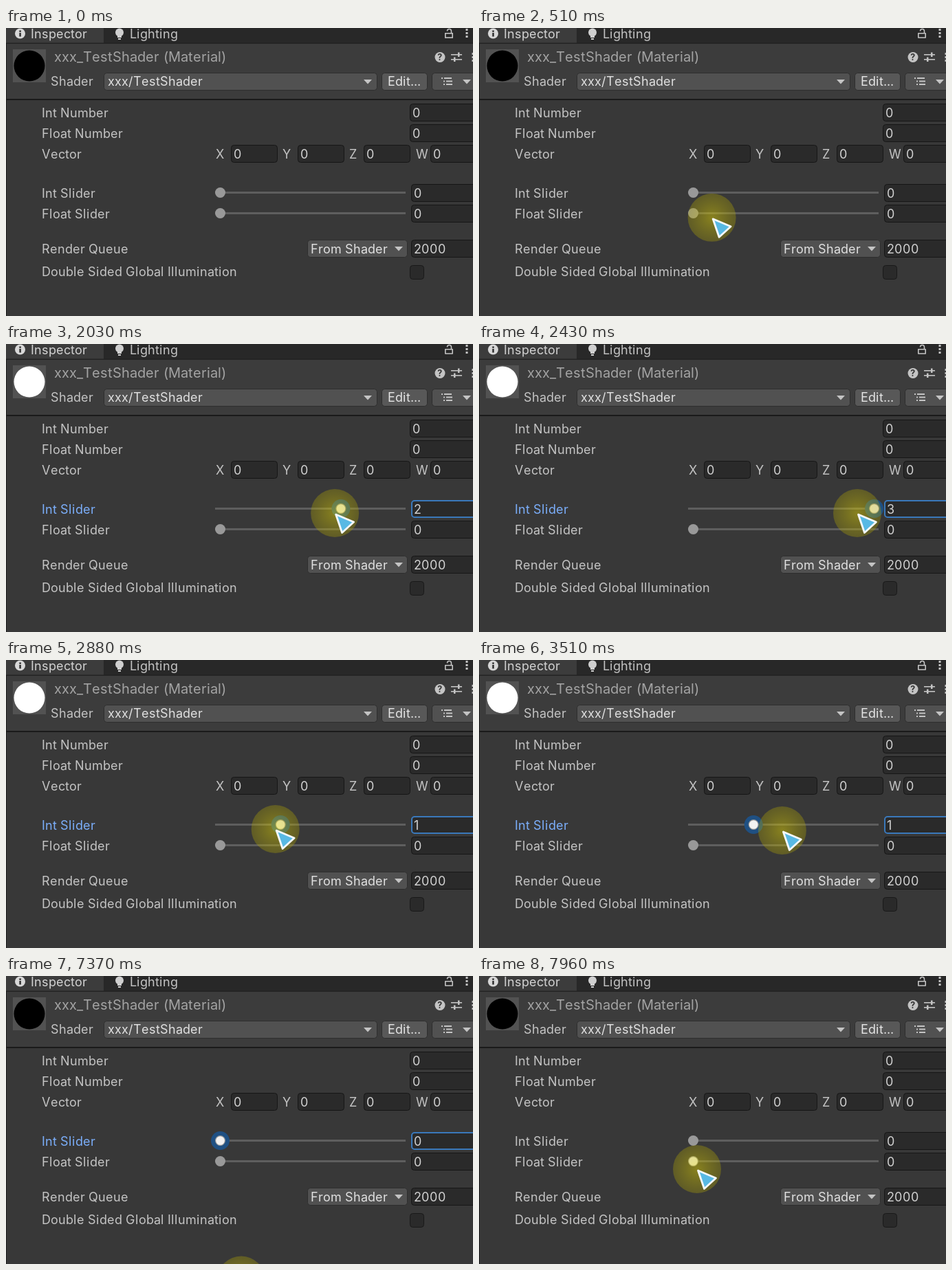
These frames come from a looping animation (679x419 px, 7.99 s). An HTML page with a canvas:

```html
<!DOCTYPE html>
<html lang="en">
<head>
<meta charset="utf-8">
<title>Material inspector</title>
<style>
html, body { margin: 0; width: 100%; height: 100%; overflow: hidden; background: #383838; }
canvas { display: block; }
</style>
</head>
<body>
<canvas id="stage" width="679" height="419"></canvas>
<script>
const ctx = document.getElementById('stage').getContext('2d');
const LOOP = 7990, PRESS = 840, RELEASE = 4000, BLUR = 7930;
const STEP = 87.7, SLIDER_X = 311.5, TEXT = '#c4c4c4', VALUE = '#d2d2d2';

// Pointer centre as [time, x, y]
const drag = [
  [30, 510, -22], [300, 420, 130], [500, 340, 276], [740, 322, 242], [1050, 322, 242],
  [1260, 388, 240], [2030, 478, 246], [2400, 550, 246], [2460, 550, 246], [2880, 392, 246],
  [3150, 316, 247], [3280, 316, 248], [3600, 470, 248], [3900, 300, 249], [4060, 298, 250],
  [4110, 410, 304], [4165, 519, 364]
];
const comeBack = [[7370, 342, 443], [7700, 319, 302], [7940, 317, 281], [LOOP, 317, 281]];

function slope(keys, i, axis) {
  return (keys[i + 1][axis] - keys[i][axis]) / (keys[i + 1][0] - keys[i][0]);
}

function tangent(keys, i, axis) {
  if (i === 0) return slope(keys, 0, axis);
  if (i === keys.length - 1) return slope(keys, i - 1, axis);
  const a = slope(keys, i - 1, axis), b = slope(keys, i, axis);
  return a * b > 0 ? 2 * a * b / (a + b) : 0;
}

// Monotone cubic through the keys; null outside their time span
function sample(keys, t) {
  if (t < keys[0][0] || t >= keys[keys.length - 1][0]) return null;
  const i = keys.findIndex(k => k[0] > t) - 1;
  const span = keys[i + 1][0] - keys[i][0], u = (t - keys[i][0]) / span;
  const ease = u * u * (3 - 2 * u);
  const [x, y] = [1, 2].map(axis =>
    keys[i][axis] * (1 - ease) + keys[i + 1][axis] * ease +
    span * u * (1 - u) * ((1 - u) * tangent(keys, i, axis) - u * tangent(keys, i + 1, axis)));
  return { x, y };
}

function rect(x, y, w, h, color) {
  ctx.fillStyle = color;
  ctx.fillRect(x, y, w, h);
}

function box(x, y, w, h, fill, border, width = 1) {
  ctx.beginPath();
  ctx.roundRect(x + width / 2, y + width / 2, w - width, h - width, 4);
  ctx.fillStyle = fill;
  ctx.fill();
  ctx.strokeStyle = border;
  ctx.lineWidth = width;
  ctx.stroke();
}

function disc(x, y, r, color) {
  ctx.beginPath();
  ctx.arc(x, y, r, 0, 7);
  ctx.fillStyle = color;
  ctx.fill();
}

function poly(points, color) {
  ctx.beginPath();
  points.forEach(p => ctx.lineTo(...p));
  ctx.closePath();
  ctx.fillStyle = color;
  ctx.fill();
}

// Letters advance by whole pixels, as in the editor's hinted text
function text(str, x, y, color = TEXT, size = 18, weight = 400) {
  ctx.font = `${weight} ${size}px Inter, sans-serif`;
  ctx.fillStyle = color;
  for (const letter of str) {
    ctx.fillText(letter, x, y);
    x += Math.round(ctx.measureText(letter).width + 0.2);
  }
}

function arrowDown(x, y) {
  poly([[x - 6, y - 3], [x + 6, y - 3], [x, y + 3.5]], TEXT);
}

function dots(x, ys) {
  ys.forEach(y => rect(x - 1.5, y - 1.5, 3, 3, TEXT));
}

function field(x, y, w, value, focused) {
  box(x, y, w, 26, '#2a2a2a', focused ? '#3a79bb' : '#161616', focused ? 2 : 1);
  text(value, x + 4, y + 20, VALUE);
}

function slider(label, y, value, focused, pointer) {
  const x = SLIDER_X + value * STEP;
  const hover = pointer && Math.hypot(pointer.x - x, pointer.y - y) < 15;
  text(label, 52, y + 7, focused ? '#7baefa' : TEXT);
  rect(304, y - 2, 277, 3, '#5e5e5e');
  if (focused) disc(x, y - 0.5, 13.5, '#1f5083');
  disc(x, y - 0.5, 7.5, '#999999');
  if (focused || hover) disc(x, y - 0.5, 6.3, '#f2f2f2');
  field(589, y - 13, 100, String(value), focused);
}

function tabs() {
  rect(0, 0, 679, 22, '#282828');
  rect(0, 0, 142, 22, '#3c3c3c');
  disc(20.5, 8, 7.5, '#d8d8d8');
  rect(19.3, 3.5, 2.6, 2.4, '#333');
  rect(19.3, 7, 2.6, 5.5, '#333');
  text('Inspector', 36, 15, VALUE);
  disc(165, 6.5, 6, '#d0d0d0');
  rect(162, 10, 6, 4, '#d0d0d0');
  rect(163, 15, 4, 2, '#d0d0d0');
  text('Lighting', 180, 15);
  ctx.strokeStyle = TEXT;
  ctx.lineWidth = 1.6;
  ctx.strokeRect(638.8, 7.8, 10.4, 6.2);
  ctx.beginPath();
  ctx.moveTo(647.5, 8);
  ctx.lineTo(647.5, 5);
  ctx.arc(644.5, 4.5, 3, 0, Math.PI, true);
  ctx.stroke();
  dots(670, [2.5, 7.5, 12.5]);
}

function header(value) {
  rect(0, 22, 679, 82, '#3c3c3c');
  rect(0, 21.5, 679, 1.5, '#232323');
  rect(10, 31, 48, 48, '#525252');
  disc(34, 55, 22.5, value ? '#fff' : '#000');
  text('xxx_TestShader (Material)', 70, 49, '#a3a3a3', 20);
  text('Shader', 65, 84);
  box(142, 65, 398, 26, '#515151', '#2e2e2e');
  text('xxx/TestShader', 148, 84, '#e0e0e0');
  arrowDown(526, 78);
  box(546, 65, 67, 26, '#585858', '#2e2e2e');
  text('Edit...', 555, 84, '#e4e4e4');
  box(619, 65, 80, 26, '#515151', '#2e2e2e');
  [73, 77.5, 82].forEach((y, i) => {
    rect(i ? 636 : 633, y - 1, 2, 2, TEXT);
    rect(i ? 640 : 637, y - 1, i ? 9 : 11, 2, TEXT);
  });
  arrowDown(670, 78);
  disc(631, 42.5, 7.5, TEXT);
  text('?', 627.3, 47, '#333', 12.5, 700);
  rect(647, 38, 16, 1.6, TEXT);
  rect(647, 45, 16, 1.6, TEXT);
  rect(657, 35.5, 2.5, 6.5, TEXT);
  rect(651, 42.5, 2.5, 6.5, TEXT);
  dots(679, [37.5, 42.5, 47.5]);
  rect(0, 103, 679, 2, '#1a1a1a');
}

function properties(value, focused, pointer) {
  text('Int Number', 52, 130);
  field(587, 110, 100, '0');
  text('Float Number', 52, 160);
  field(587, 140, 100, '0');
  text('Vector', 52, 190);
  [...'XYZW'].forEach((axis, i) => {
    text(axis, 305 + i * 97, 190);
    field(Math.round(327 + i * 96.7), 170, 68, '0');
  });
  slider('Int Slider', 240, value, focused, pointer);
  slider('Float Slider', 270, 0, false, pointer);
  text('Render Queue', 52, 328);
  box(438, 308, 146, 26, '#515151', '#2e2e2e');
  text('From Shader', 443, 328, '#e0e0e0');
  arrowDown(571, 321);
  field(589, 308, 100, '2000');
  text('Double Sided Global Illumination', 52, 361);
  box(587, 345, 21, 21, '#2a2a2a', '#191919');
}

function drawPointer({ x, y }) {
  const glow = ctx.createRadialGradient(x, y, 0, x, y, 35);
  glow.addColorStop(0, 'rgba(235,220,0,.45)');
  glow.addColorStop(1, 'rgba(180,168,0,.32)');
  disc(x, y, 35, glow);
  poly([[x + 1.5, y + 2], [x + 27.5, y + 13], [x + 10.5, y + 28.5]], '#58b9e4');
  ctx.strokeStyle = '#f4f8fa';
  ctx.lineWidth = 2.8;
  ctx.lineJoin = 'round';
  ctx.stroke();
}

function drawRing(age) {
  ctx.globalAlpha = 1 - 0.3 * age / 820;
  ctx.beginPath();
  ctx.arc(322.5, 241.8, age * 0.05, 0, 7);
  ctx.strokeStyle = '#cc0f0f';
  ctx.lineWidth = 2.5;
  ctx.stroke();
  ctx.globalAlpha = 1;
}

function draw(now) {
  const t = now % LOOP;
  const pointer = sample(drag, t) || sample(comeBack, t);
  const focused = t >= PRESS && t < BLUR;
  const dragging = t >= PRESS && t < RELEASE;
  const value = dragging ? Math.max(0, Math.min(3, Math.round((pointer.x - SLIDER_X) / STEP))) : 0;
  const ringAge = t - PRESS;

  rect(0, 0, 679, 419, '#383838');
  tabs();
  header(value);
  properties(value, focused, pointer);
  rect(0, 22, 1, 397, '#202020');
  if (ringAge >= 0 && ringAge < 820) drawRing(ringAge);
  if (pointer) drawPointer(pointer);
  requestAnimationFrame(() => draw(performance.now() - start));
}

const start = performance.now();
draw(0);
</script>
</body>
</html>
```
